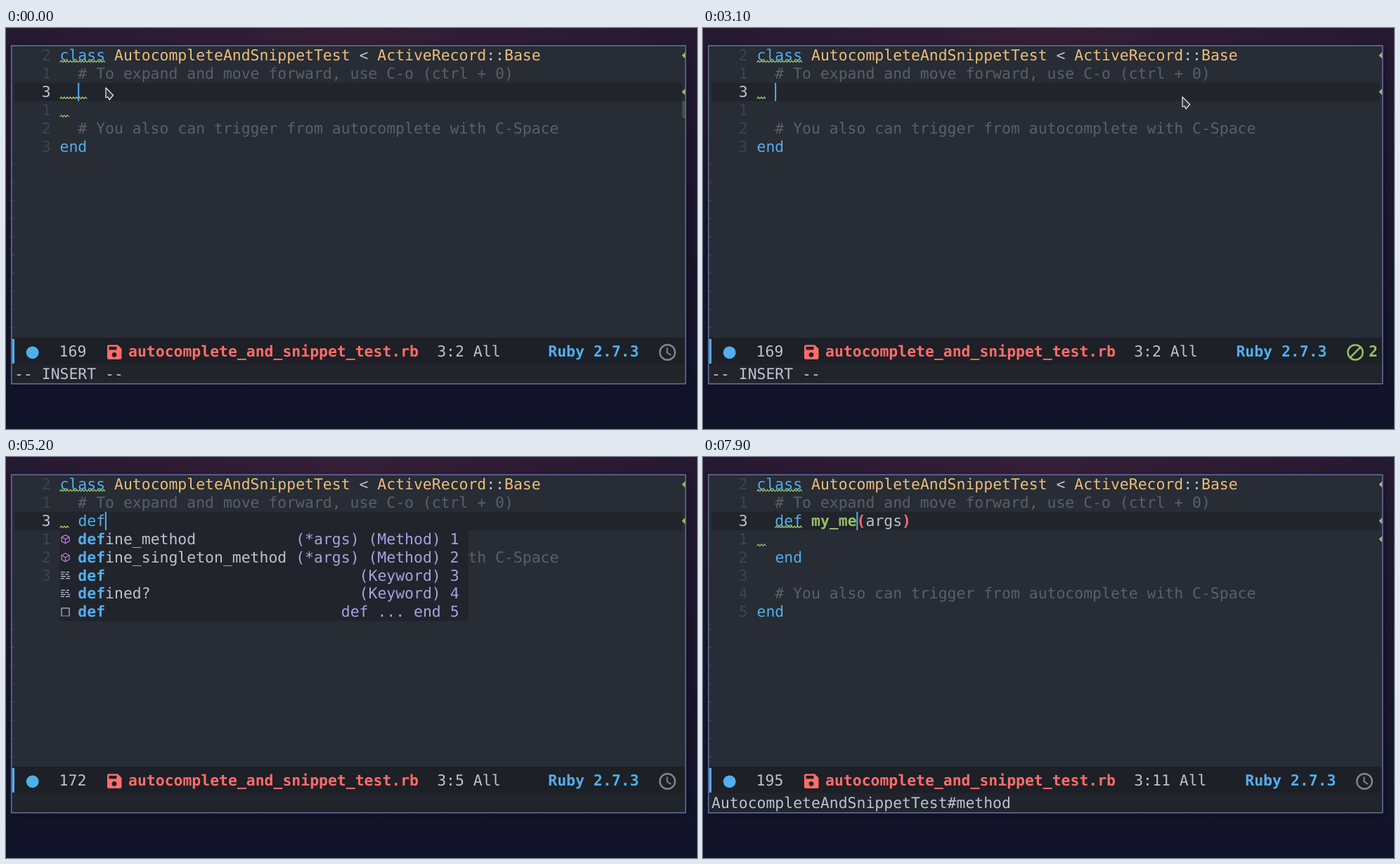
Write an HTML page that moves like this. It is 983 by 570 pixels and loops after 8000 ms.

```html
<!DOCTYPE html>
<html lang="en">
<head>
<meta charset="utf-8">
<title>Autocomplete and snippets</title>
<style>
  html, body { margin: 0; width: 100%; height: 100%; overflow: hidden; background: #15152b; }
  svg { display: block; width: 983px; height: 570px; }
  text {
    font-family: "DejaVu Sans Mono", monospace; font-size: 21.444px;
    white-space: pre; text-rendering: geometricPrecision;
  }
</style>
</head>
<body>
<svg viewBox="0 0 983 570">
  <defs>
    <linearGradient id="sky" x1="0" y1="0" x2="0" y2="1">
      <stop offset="0" stop-color="#251a31"/>
      <stop offset=".5" stop-color="#19162d"/>
      <stop offset="1" stop-color="#12142a"/>
    </linearGradient>
    <radialGradient id="glow" cx=".5" cy="0" r=".5">
      <stop offset="0" stop-color="#3a2039" stop-opacity=".8"/>
      <stop offset="1" stop-color="#3a2039" stop-opacity="0"/>
    </radialGradient>
    <filter id="soft"><feGaussianBlur stdDeviation="4"/></filter>
  </defs>
  <rect width="983" height="570" fill="url(#sky)"/>
  <rect width="983" height="570" fill="url(#glow)"/>
  <rect x="8" y="26" width="961" height="482" fill="#000" opacity=".35" filter="url(#soft)"/>
  <rect x="8" y="25" width="958.5" height="480.5" fill="#282c34"/>
  <rect x="12" y="78" width="950" height="26" fill="#21242b"/>
  <rect x="8" y="440" width="958" height="38" fill="#1d2026"/>
  <rect x="8" y="478" width="958" height="27" fill="#21242b"/>
  <rect x="8.5" y="442" width="3.5" height="35" fill="#51afef"/>
  <g id="screen"></g>
  <rect x="7.75" y="25.25" width="959" height="480.5" fill="none" stroke="#626e9e" stroke-width="1.6"/>
  <path id="pointer" d="M1 1V15L4 14L6 18L11.500 11.500Z" fill="#33363c" stroke="#e6e6e6" stroke-width="1.3" stroke-linejoin="round"/>
</svg>
<script>
const LOOP = 8000, CELL = 12.91, LEFT = 76.55, TOP = 26.3, ROW = 25.86;
const C = {
  fg: '#bbc2cf', blue: '#51afef', yellow: '#ecbe7b', green: '#98be65', red: '#ff6c6b',
  violet: '#a9a1e1', purple: '#c678dd', comment: '#5b6067', number: '#3f444a', grey: '#83868c'
};
const screen = document.getElementById('screen');
const pointer = document.getElementById('pointer');

const colX = col => LEFT + col * CELL;
const rowY = row => TOP + row * ROW;
const span = (s, color, bold) =>
  `<tspan fill="${C[color]}"${bold ? ' font-weight="bold"' : ''}>${s}</tspan>`;
const label = (x, y, content) => `<text x="${x}" y="${y}" fill="${C.fg}">${content}</text>`;
const cellText = (col, row, content) => label(colX(col), rowY(row) + 19.9, content);
const stroke = (d, color, width) =>
  `<path d="${d}" fill="none" stroke="${C[color]}" stroke-width="${width}"/>`;

function squiggle(row, from, to, color = 'green') {
  const y = rowY(row) + 20, step = CELL / 6;
  let d = '';
  for (let i = 0; i <= (to - from) * 6; i++)
    d += `${i ? 'L' : 'M'}${colX(from) + i * step} ${y + (i % 2 ? 0 : 2.6)}`;
  return stroke(d, color, 1.2);
}

const fringeArrow = (row, color = 'green') =>
  `<path d="M961.500 ${rowY(row) + 12.8}l4.500 -4.500v9z" fill="${C[color]}"/>`;

function fringeDots(row) {
  let d = '';
  for (let i = 0; i < 12; i++) d += `M${962 + i % 2} ${rowY(row) + 1 + i * 2}h1m1 0h1`;
  return stroke(d, 'green', 1);
}

function codeLines(t) {
  const head = span('class ', 'blue') + span('AutocompleteAndSnippetTest', 'yellow') + ' &lt; ' +
    span('ActiveRecord', 'yellow') + '::' + span('Base', 'yellow');
  const note = span('  # To expand and move forward, use C-o (ctrl + 0)', 'comment');
  const hint = span('  # You also can trigger from autocomplete with C-Space', 'comment');
  const end = span('end', 'blue');
  if (t < 5900) {
    const typed = t < 3800 ? '' : t < 4000 ? 'd' : t < 4200 ? 'de' : span('def', 'blue');
    return [head, note, '  ' + typed, '', hint, end];
  }
  const paren = s => t < 7300 ? s : span(s, 'red', true);
  const method = span('  def ', 'blue') + span(methodName(t), 'green', true) +
    paren('(') + 'args' + paren(')');
  return [head, note, method, '', '  ' + end, '', hint, end];
}

function methodName(t) {
  if (t < 7200) return 'method';
  return 'my_me'.slice(0, 1 + [7400, 7600, 7800, 7900].filter(at => t >= at).length);
}

function caretColumn(t) {
  if (t < 5900) return t < 3800 ? 2 : t < 4000 ? 3 : t < 4200 ? 4 : 5;
  return t < 7200 ? 6 : 6 + methodName(t).length;
}

function bufferSize(t) {
  if (t < 5900) return 167 + caretColumn(t);
  return 190 + methodName(t).length;
}

function diagnostics(t) {
  if (t < 6300) {
    const early = t < 700;
    return squiggle(0, 0, 5) + squiggle(2, 0, early ? 3 : 1) + fringeArrow(0) + fringeArrow(2) +
      (early ? squiggle(3, 0, 1) + fringeDots(3) : '');
  }
  if (t < 7400) return squiggle(6, 0, 1, 'red') + fringeArrow(6, 'red');
  if (t < 7600) return '';
  return squiggle(0, 0, 5) + squiggle(2, 2, 5) + squiggle(3, 0, 1) +
    [0, 2, 3].map(row => fringeArrow(row)).join('');
}

const icons = {
  cube: y => stroke(`M84.500 ${y - 6}l5.500 3v6l-5.500 3l-5.500 -3v-6zM79 ${y - 3}l5.500 3l5.500 -3M84.500 ${y}v6`, 'purple', 1.2),
  lines: y => stroke(`M78 ${y - 5}h6m2 0h4M78 ${y - 2}h4m2 0h5M78 ${y + 1}h7m2 0h4M78 ${y + 4}h5m2 0h6`, 'fg', 1.3),
  box: y => `<rect x="79" y="${y - 5.5}" width="11" height="11" fill="none" stroke="${C.fg}" stroke-width="1.2"/>`
    + `<path d="M80 ${y + 5.5}h10" stroke="#21242b" stroke-width="1.4" stroke-dasharray="1 1"/>`
};

function popup(t) {
  if (t < 4000 || t >= 5900) return '';
  const prefix = t < 4200 ? 'de' : 'def';
  const method = '(*args) (Method)', keyword = '(Keyword)';
  let items = [
    ['cube', 'define_method', method], ['cube', 'define_singleton_method', method],
    ['lines', 'def', keyword], ['lines', 'defined?', keyword], ['box', 'def', 'def ... end']
  ];
  if (t < 4200) items = items.slice(0, 4).concat([
    ['cube', 'deep_dup', '() (Method)'], ['cube', 'delegate', method], ['box', 'def', 'def ... end'],
    ['box', 'deli', 'delete_if'], ['box', 'dee', 'deep_copy'], ['box', 'det', 'detect']
  ]);
  let out = `<rect x="${LEFT}" y="${rowY(3)}" width="${45 * CELL}" height="${items.length * ROW}" fill="#21242b"/>`;
  items.forEach(([icon, name, kind], i) => {
    const row = 3 + i, tail = `${kind} ${(i + 1) % 10}`;
    out += icons[icon](rowY(row) + 13) +
      cellText(2, row, span(prefix, 'blue', true) + name.slice(prefix.length)) +
      cellText(44 - tail.length, row, span(tail, 'violet'));
  });
  if (t < 4200)
    out += `<rect x="${colX(44)}" y="${rowY(3)}" width="6" height="${ROW * 6}" fill="${C.blue}"/>`;
  return out;
}

function fringeTildes(t) {
  const first = t < 4000 ? 6 : t < 4200 ? 13 : 8;
  let d = '';
  for (let row = first; row < 16; row++) d += `M8.500 ${rowY(row) + 13}q1.200 -3 3.500 -.500`;
  return stroke(d, 'number', 1.3);
}

function checkStatus(t) {
  const done = (color, count) =>
    `<circle cx="928" cy="461" r="10.600" fill="none" stroke="${C[color]}" stroke-width="2.500"/>` +
    stroke('M920.700 468.300L935.300 453.700', color, 2.5) +
    label(947, 467.4, span(count, color, true));
  if (t >= 1500 && t < 5200) return [758.4, done('green', 2)];
  if (t >= 6300 && t < 6500) return [758.4, done('red', 1)];
  return [771.3, `<circle cx="941" cy="461" r="10.800" fill="none" stroke="${C.grey}" stroke-width="2.400"/>` +
    stroke('M940.500 454.500V461.500L946 465', 'grey', 2)];
}

function modeLine(t) {
  const [langX, status] = checkStatus(t);
  return `<circle cx="37.700" cy="461.300" r="8.900" fill="${C.blue}"/>` +
    `<path fill-rule="evenodd" fill="${C.red}" d="M146 450.500H159L164.500 456V469a2 2 0 0 1 -2 2H146a2 2 0 0 1 -2 -2V452.500a2 2 0 0 1 2 -2zM146.500 453V457.500H157.500V453zM154 461a3.500 3.500 0 1 0 .01 0z"/>` +
    label(75.6, 467.4, bufferSize(t)) +
    label(174, 467.4, span('autocomplete_and_snippet_test.rb', 'red', true)) +
    label(613.2, 467.4, `3:${caretColumn(t)} All`) +
    label(langX, 467.4, span('Ruby 2.7.3', 'blue', true)) + status;
}

function echoArea(t) {
  const shown = t < 3800 ? '-- INSERT --' :
    (t >= 6500 && t < 7300) || t >= 7900 ? 'AutocompleteAndSnippetTest#method' : '';
  return label(12, 499.1, shown);
}

function draw(t) {
  const code = codeLines(t).map((line, row) => {
    const number = row === 2 ? span(3, 'fg') : span(Math.abs(row - 2), 'number');
    return cellText(-2, row, number) + cellText(0, row, line);
  }).join('');
  return fringeTildes(t) + code + diagnostics(t) + popup(t) +
    `<rect x="${colX(caretColumn(t)) - .2}" y="78" width="2" height="26" fill="${C.blue}"/>` +
    modeLine(t) + echoArea(t);
}

// Pointer stops: time, x, y
const stops = [
  [1400, 141, 84], [1600, 116, 79], [1800, 91, 69], [1900, 97, 67],
  [2000, 122, 68], [2300, 235, 79], [2400, 289, 88], [2500, 289, 88]
];

function pointerAt(t) {
  if (t < 1400) return [141, 84];
  if (t >= 3400) {
    const k = Math.min(1, (t - 3400) / 200);
    return [811 + 51 * k, 100 + 3 * k];
  }
  if (t >= 2500) {
    const p = (t - 2500) / 900, k = (1 - Math.cos(Math.PI * p)) / 2;
    return [289 + 522 * k, 88 + 12 * k];
  }
  const i = stops.findIndex(stop => stop[0] > t);
  const [t0, x0, y0] = stops[i - 1], [t1, x1, y1] = stops[i];
  const k = (t - t0) / (t1 - t0);
  return [x0 + (x1 - x0) * k, y0 + (y1 - y0) * k];
}

let shownTick = -1;
function render(ms) {
  const t = Math.floor(ms % LOOP / 100) * 100;
  if (t === shownTick) return;
  shownTick = t;
  screen.innerHTML = draw(t);
  pointer.style.display = t < 3800 ? '' : 'none';
  pointer.setAttribute('transform', `translate(${pointerAt(t).map(Math.round)})`);
}

const start = performance.now();
function tick() {
  render(performance.now() - start);
  requestAnimationFrame(tick);
}
tick();
</script>
</body>
</html>
```
